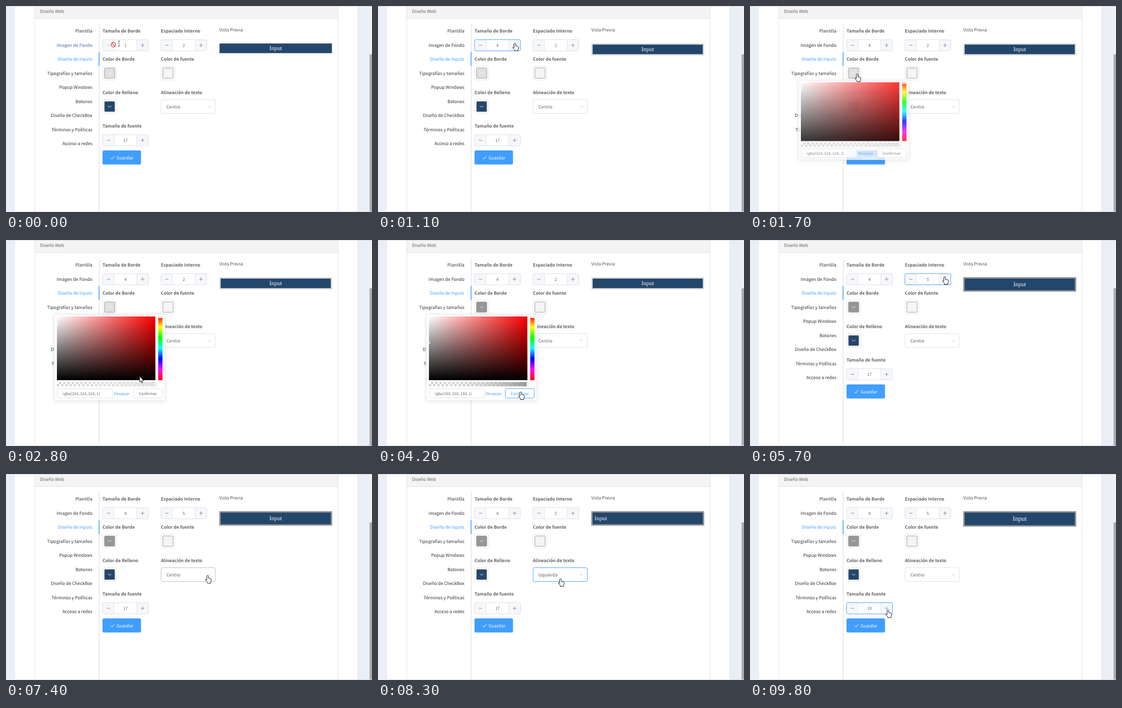
An HTML page with a canvas that plays this animation: 690 by 388 pixels, repeating every 10000 ms.

```html
<!DOCTYPE html>
<html lang="es">
<head>
<meta charset="utf-8">
<title>Diseño Web</title>
<style>
  html, body { margin: 0; width: 100%; height: 100%; overflow: hidden; background: #fff; }
  canvas { display: block; }
</style>
</head>
<body>
<canvas id="stage" width="690" height="388"></canvas>
<script>
const ctx = document.getElementById('stage').getContext('2d');
const LOOP = 10000, STEP = 100, PX = 0.665;
const BLUE = '#409eff', GREY = '#606266', LINE = '#dcdfe6', NAVY = '#23466b';
const SANS = '"Noto Sans CJK SC", "Noto Sans CJK JP", "Open Sans", sans-serif';
const MENU = ['Plantilla', 'Imagen de Fondo', 'Diseño de Inputs', 'Tipografías y tamaños', 'Popup Windows',
  'Botones', 'Diseño de CheckBox', 'Términos y Políticas', 'Acceso a redes'];
const LABELS = [['Tamaño de Borde', 182, 47], ['Espaciado Interno', 292, 47], ['Color de Borde', 182, 100],
  ['Color de fuente', 292, 100], ['Color de Relleno', 182, 163], ['Alineación de texto', 292, 163],
  ['Tamaño de fuente', 182, 226]];
const CURSORS = {
  hand: new Path2D('M-1.5 1Q0-1 1.5 1V5L6 6.3Q7.4 6.8 7.1 9L6 12V14.5H-.5V12.5L-4 9Q-4.4 6.8-1.5 8.3Z'),
  arrow: new Path2D('M0 0V11L2.5 8.7 4.2 12.5 5.8 11.8 4.2 8.2H7.5Z'),
  beam: new Path2D('M-2-5H2M0-5V5M-2 5H2')
};
// time, x, y, shape
const PATH = [
  [0, 213, 71, 'beam'], [100, 225, 72, 'beam'], [400, 258, 70, 'hand'], [1100, 258, 70, 'hand'],
  [1600, 202, 128, 'hand'], [1900, 202, 128, 'arrow'], [2300, 170, 185, 'arrow'], [2700, 270, 268, 'arrow'],
  [3200, 97, 159, 'arrow'], [3300, 97, 159, 'arrow'], [3700, 97, 193, 'arrow'], [4100, 269, 286, 'hand'],
  [4300, 269, 286, 'arrow'], [5000, 367, 69, 'hand'], [6000, 367, 69, 'arrow'], [6500, 560, 95, 'arrow'],
  [6900, 262, 165, 'arrow'], [7100, 283, 188, 'arrow'], [7300, 380, 191, 'hand'], [7500, 380, 191, 'hand'],
  [7800, 342, 217, 'hand'], [8000, 342, 217, 'hand'], [8300, 344, 197, 'hand'], [8400, 344, 197, 'hand'],
  [8700, 343, 242, 'hand'], [8800, 343, 242, 'arrow'], [9200, 260, 256, 'hand'], [LOOP, 260, 256, 'hand']
];

const clamp = v => Math.max(0, Math.min(1, v));
const mix = (a, b, k) => a + (b - a) * k;
const within = (t, a, b) => t >= a && t < b;
const count = (t, start, times) => start + times.filter(at => t >= at).length;
const easeOut = ms => 1 - (1 - clamp(ms / 300)) ** 5;
const popup = (t, open, close) => easeOut(t - open) - easeOut(t - close);

function text(s, x, y, color = GREY, { size = 14, weight = 400, align = 'left' } = {}) {
  ctx.font = `${weight} ${size * PX * 0.895}px ${SANS}`;
  ctx.textAlign = align;
  ctx.fillStyle = color;
  ctx.fillText(s, x, y + size * PX * 0.33);
}

function rect(x, y, w, h, fill) {
  ctx.fillStyle = fill;
  ctx.fillRect(x, y, w, h);
}

function box(x, y, w, h, fill, stroke, r = 2.7) {
  ctx.beginPath();
  ctx.roundRect(x, y, w, h, r);
  if (fill) { ctx.fillStyle = fill; ctx.fill(); }
  if (stroke) { ctx.strokeStyle = stroke; ctx.lineWidth = 0.9; ctx.stroke(); }
}

function line(color, width, ...points) {
  ctx.beginPath();
  points.forEach(([x, y]) => ctx.lineTo(x, y));
  ctx.strokeStyle = color;
  ctx.lineWidth = width;
  ctx.stroke();
}

const chevron = (x, y, color, dir = 1) =>
  line(color, 0.9, [x - 3.2, y - 1.6 * dir], [x, y + 1.6 * dir], [x + 3.2, y - 1.6 * dir]);

function gradient(x0, y0, x1, y1, ...colors) {
  const g = ctx.createLinearGradient(x0, y0, x1, y1);
  colors.forEach((c, i) => g.addColorStop(i / (colors.length - 1), c));
  return g;
}

function shadowBox(x, y, w, h) {
  ctx.save();
  ctx.shadowColor = 'rgba(0,0,0,.12)';
  ctx.shadowBlur = 8;
  ctx.shadowOffsetY = 1.3;
  box(x, y, w, h, '#fff');
  ctx.restore();
  box(x, y, w, h, null, '#e8ebf1');
}

// Draws a layer that unfolds downward from its top edge
function unfold(k, top, draw) {
  if (k < 0.01) return;
  ctx.save();
  ctx.globalAlpha = k ** 3;
  ctx.translate(0, top);
  ctx.scale(1, k);
  ctx.translate(0, -top);
  draw();
  ctx.restore();
}

function stepper(x, y, value, hot, atMinimum) {
  const edge = hot ? BLUE : LINE, cy = y + 10.6;
  box(x, y, 86.5, 21.2, '#f5f7fa', null);
  rect(x + 21.7, y, 43, 21.2, '#fff');
  box(x, y, 86.5, 21.2, null, edge);
  for (const dx of [21.7, 64.7]) line(LINE, 0.8, [x + dx, y + 0.5], [x + dx, y + 20.7]);
  line(atMinimum ? '#c0c4cc' : '#73767c', 0.8, [x + 8, cy], [x + 14.5, cy]);
  const plus = hot ? BLUE : '#73767c';
  line(plus, 0.8, [x + 72.3, cy], [x + 78.8, cy]);
  line(plus, 0.8, [x + 75.5, cy - 3.3], [x + 75.5, cy + 3.3]);
  text(value, x + 43.2, cy, GREY, { size: 13, align: 'center' });
}

function swatch(x, y, color) {
  box(x + 0.4, y, 26, 26, '#fff', '#e4e4e4');
  box(x + 3.7, y + 3.3, 19.4, 19.4, color, '#999', 1.4);
  chevron(x + 13.4, y + 13, '#fff');
}

function page(t) {
  rect(0, 0, 690, 388, '#fff');
  rect(0, 0, 17, 388, '#eaeef7');
  rect(662, 0, 23, 388, '#eaeef7');
  rect(685, 0, 5, 388, '#f0f0f0');
  rect(685.5, 91, 4.5, 297, '#a9a9ab');
  rect(54, 0, 572, 23, '#f4f4f5');
  rect(54, 23, 572, 0.9, LINE);
  rect(53.6, 0, 0.9, 388, '#dedfe3');
  rect(625.4, 0, 0.9, 388, '#dedfe3');
  rect(0, 0, 690, 1, '#d6d7d9');
  rect(17, 387, 673, 1, '#dadbdd');
  text('Diseño Web', 64, 10);

  rect(175, 34, 1.3, 354, '#dfe2e8');
  rect(174.7, 87, 1.5, 26, BLUE);
  const hover = clamp(1 - t / 400);
  MENU.forEach((item, i) => {
    const color = i === 1 ? `rgb(${mix(48, 68, hover)},${mix(49, 105, hover)},${mix(51, 155, hover)})`
      : i === 2 ? BLUE : '#303133';
    text(item, 163, 47 + i * 26.55, color, { align: 'right' });
  });
  for (const [label, x, y] of LABELS) text(label, x, y, GREY, { weight: 700 });
  text('Vista Previa', 402, 45, '#505257');
  box(182, 272, 72.5, 26.6, BLUE);
  line('#fff', 1, [197.2, 285.8], [199.7, 288.3], [204.4, 282.6]);
  text('Guardar', 208.5, 285.5, '#fff', { weight: 500 });
}

function preview(border, padding, size, color, left) {
  const b = border * PX, p = padding * PX, h = size * 1.36 * PX + 2 * (p + b);
  rect(402, 70, 213, h, color);
  rect(402 + b, 70 + b, 213 - 2 * b, h - 2 * b, NAVY);
  ctx.font = `${size * PX}px "Liberation Serif", "Times New Roman", serif`;
  ctx.textAlign = left ? 'left' : 'center';
  ctx.fillStyle = '#f4f4f4';
  ctx.fillText('Input', left ? 402 + b + p : 508.5, 70 + h / 2 + size * PX * 0.3);
}

function colorPicker(level, confirmHot) {
  const gray = `rgb(${level},${level},${level})`;
  shadowBox(91.5, 140.3, 208, 162);
  rect(96, 144, 185.5, 120, gradient(96, 0, 281.5, 0, '#fff', '#f00'));
  rect(96, 144, 185.5, 120, gradient(0, 144, 0, 264, 'rgba(0,0,0,0)', '#000'));
  const y = 144 + 120 * (1 - level / 255);
  ctx.beginPath();
  ctx.arc(96, y, 2, 0, 7);
  ctx.strokeStyle = '#fff';
  ctx.lineWidth = 1;
  ctx.stroke();
  rect(287, 144, 8, 120, gradient(0, 144, 0, 264, '#f00', '#ff0', '#0f0', '#0ff', '#00f', '#f0f', '#f00'));
  box(286.6, 144, 8.8, 2.7, '#fff', '#ddd', 0.7);
  for (let i = 0; i < 47; i++)
    for (let j = 0; j < 2; j++)
      rect(96 + i * 4, 267.5 + j * 4, Math.min(4, 281.5 - 96 - i * 4), 4, (i + j) % 2 ? '#ccc' : '#fff');
  rect(96, 267.5, 185.5, 8, gradient(96, 0, 281.5, 0, 'rgba(255,255,255,0)', gray));
  box(280.7, 267.2, 2.6, 8.6, '#fff', '#ddd', 0.7);
  box(96.3, 280, 105, 17.6, '#fff', LINE);
  const small = { size: 12 };
  text(`rgba(${level}, ${level}, ${level}, 1)`, 107, 289, GREY, small);
  text('Despejar', 203.7, 289, BLUE, small);
  box(240, 279.8, 54.8, 18, '#fff', confirmHot ? BLUE : LINE);
  text('Confirmar', 267.4, 289, confirmHot ? BLUE : GREY, { size: 12, align: 'center' });
}

function optionList(selected, hot) {
  shadowBox(292, 211, 103, 76);
  ['Izquierda', 'Centro', 'Derecha'].forEach((name, i) => {
    const y = 215 + i * 22.6;
    if (i === hot) rect(292.5, y, 102, 22.6, '#f5f7fa');
    text(name, 305, y + 11.3, name === selected ? BLUE : GREY, { weight: name === selected ? 700 : 400 });
  });
}

function cursor(t) {
  const i = PATH.findIndex((key, n) => t < PATH[n + 1][0]);
  const [t0, x0, y0, shape] = PATH[i], [t1, x1, y1] = PATH[i + 1];
  const p = (t - t0) / (t1 - t0), k = p * p * (3 - 2 * p);
  ctx.save();
  if (t < 100) {
    ctx.beginPath();
    ctx.arc(202.5, 73, 4.3, 0, 7);
    ctx.fillStyle = '#fff';
    ctx.fill();
    ctx.strokeStyle = '#dc5550';
    ctx.lineWidth = 1.4;
    ctx.stroke();
    line('#dc5550', 1.4, [199.5, 70], [205.5, 76]);
  }
  ctx.translate(mix(x0, x1, k), mix(y0, y1, k));
  ctx.strokeStyle = shape === 'beam' ? '#666' : '#26282e';
  ctx.lineWidth = 1;
  ctx.lineJoin = 'round';
  if (shape !== 'beam') {
    ctx.fillStyle = '#fff';
    ctx.fill(CURSORS[shape]);
  }
  ctx.stroke(CURSORS[shape]);
  ctx.restore();
}

function draw(t) {
  const border = count(t, 1, [700, 900, 1100]);
  const padding = count(t, 2, [5300, 5400, 5500]);
  const size = count(t, 17, [9700, 9800]);
  const drag = clamp((t - 3300) / 400);
  const level = Math.round(mix(224, 150, drag * drag * (3 - 2 * drag)));
  const left = within(t, 8000, 8800), align = left ? 'Izquierda' : 'Centro';
  const listOpen = within(t, 7500, 8000) || within(t, 8400, 8800);

  page(t);
  stepper(182, 63.3, border, within(t, 400, 1200), border === 1);
  stepper(292, 63.3, padding, within(t, 5000, 6100));
  stepper(182, 242.4, size, t >= 9200);
  swatch(182, 113.4, `rgb(${level},${level},${level})`);
  swatch(292, 113.4, '#f4f4f4');
  swatch(182, 176.4, NAVY);
  const edge = within(t, 7500, 8900) ? BLUE : within(t, 7300, 7500) ? '#b9bdc6' : LINE;
  box(292.3, 176.5, 102.4, 26, '#fff', edge);
  text(align, 302.5, 189.5);
  chevron(383.3, 189.5, '#c0c4cc', listOpen ? -1 : 1);
  preview(border, padding, size, t < 4300 ? '#e0e0e0' : '#969696', left);

  unfold(popup(t, 1580, 4300), 140, () => colorPicker(level, within(t, 4000, 4400)));
  unfold(popup(t, 7480, 8000), 207, () => optionList(align, 0));
  unfold(popup(t, 8380, 8800), 207, () => optionList(align, t < 8600 ? 0 : 1));
  cursor(t);
}

ctx.textRendering = 'geometricPrecision';
const start = performance.now();
function tick() {
  const elapsed = Math.max(0, performance.now() - start) % LOOP;
  draw(Math.floor(elapsed / STEP) * STEP);
  requestAnimationFrame(tick);
}
tick();
</script>
</body>
</html>
```
